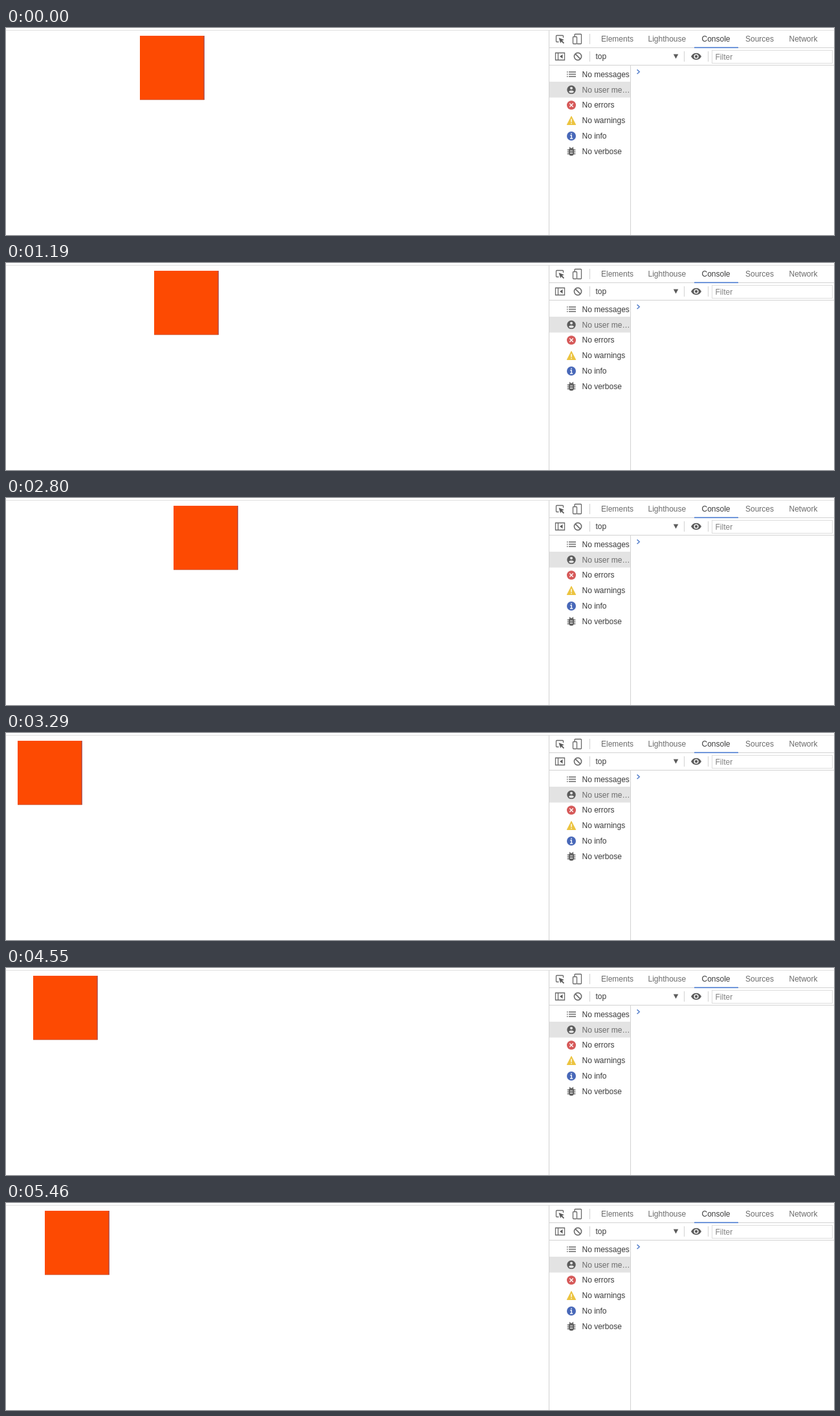
Write an HTML page that moves like this. It is 1280 px wide and 320 px high and loops after 5600 ms.

```html
<!DOCTYPE html>
<html lang="en">
<head>
<meta charset="utf-8">
<title>Moving square</title>
<style>
html, body { margin: 0; width: 100%; height: 100%; overflow: hidden; background: #fff; }
svg { display: block; width: 1280px; height: 320px; }
text { font: 12px "Liberation Sans", Arial, sans-serif; fill: #3a3a3a; }
.soft { fill: #6b6b6b; }
.hint { fill: #828282; }
.rule { fill: none; stroke: #d2d2d2; }
.icon { fill: none; stroke: #6a6a6a; stroke-width: 1.3; }
.solid { fill: #5c5c5c; }
.white { fill: none; stroke: #fff; stroke-width: 1.4; }
</style>
</head>
<body>
<svg viewBox="0 0 1280 320">
  <path class="rule" d="M0 3.5H1280" style="stroke:#dedede"/>

  <g id="box">
    <rect y="12" width="99.5" height="99" fill="#fd4a02"/>
    <path d="M99.2 12V111" stroke="#8a4a66"/>
    <path d="M0 110.8H99.5" stroke="#c25a3c" stroke-width=".8"/>
  </g>

  <!-- panel lines -->
  <path class="rule" d="M839.5 4V320M840 30.5H1280M840 57.5H1280M965.5 58V320M902.5 9V25M902.5 36V52M1048.5 36V52M1085.5 36V52"/>
  <rect class="rule" x="1091.5" y="34.5" width="186" height="20" style="stroke:#dcdcdc"/>
  <rect x="1064" y="29.5" width="68" height="1.6" fill="#4a7bd0"/>
  <rect x="840" y="83" width="125" height="24.5" fill="#e3e3e3"/>

  <!-- tab bar icons -->
  <path class="icon" d="M854.5 21.5H851.5Q850.5 21.5 850.5 20.5V12.5Q850.5 11.5 851.5 11.5H860.5Q861.5 11.5 861.5 12.5V15"/>
  <path class="solid" d="M854.5 15L862.8 18.3L859.8 19.5L863 23L861.8 24.2L858.6 20.9L857.2 23.4Z"/>
  <path class="icon" d="M879 13V10.5Q879 9.5 880 9.5H888.5Q889.5 9.5 889.5 10.5V23.5Q889.5 24.5 888.5 24.5H883M876.5 14.5Q876.5 13.5 877.5 13.5H881.5Q882.5 13.5 882.5 14.5V23.5Q882.5 24.5 881.5 24.5H877.5Q876.5 24.5 876.5 23.5Z"/>

  <!-- filter bar icons -->
  <path class="icon" d="M849.5 38.5H863.5V49.5H849.5ZM853.5 38.5V49.5"/>
  <path class="solid" d="M860.5 40.8V47.2L856 44Z"/>
  <circle class="icon" cx="884" cy="44" r="5.6" style="stroke-width:1.6"/>
  <path class="icon" d="M880.1 40.1L887.9 47.9" style="stroke-width:1.6"/>
  <path class="solid" d="M1031.8 40.5H1039.3L1035.5 47.5Z"/>
  <path class="solid" d="M1059 44Q1061.8 38.8 1067 38.8T1075 44Q1072.2 49.2 1067 49.2T1059 44Z"/>
  <circle cx="1067" cy="44" r="2.9" class="white"/>

  <path d="M975.6 64.4L979.2 67.7L975.6 71" fill="none" stroke="#5580cc" stroke-width="1.5"/>

  <!-- sidebar icons -->
  <path class="icon" d="M870 68H881M870 71.5H881M870 75H881M867 68H868.5M867 71.5H868.5M867 75H868.5"/>
  <circle class="solid" cx="874" cy="95.4" r="6.7"/>
  <circle cx="874" cy="93" r="2.1" fill="#e3e3e3"/>
  <path d="M869.8 98.4Q871 96.4 874 96.4T878.2 98.4Q876.6 100.4 874 100.4T869.8 98.4Z" fill="#e3e3e3"/>
  <circle cx="874" cy="119.2" r="7" fill="#d65a5a"/>
  <path class="white" d="M871.3 116.5L876.7 121.9M876.7 116.5L871.3 121.9"/>
  <path d="M874 136.5L880.7 149.5H867.3Z" fill="#ecc440" stroke="#ecc440" stroke-linejoin="round"/>
  <path class="white" d="M874 140.5V145.5M874 146.8V148.3"/>
  <circle cx="874" cy="167" r="7" fill="#4868b8"/>
  <path class="white" d="M874 162.5V164.3M872.3 166H874.2V170.5M872 170.8H876.2"/>
  <g class="solid">
    <path d="M870 188Q870 185.7 874 185.7T878 188V193.5Q878 197.5 874 197.5T870 193.5Z"/>
    <path class="icon" d="M867.6 188.5H880.4M867.6 191.5H880.4M867.6 194.5H880.4M871 184.3L873 186.5M877 184.3L875 186.5"/>
    <path d="M872 190H876M872 193.3H876" stroke="#fff" stroke-width="1.2"/>
  </g>

  <g id="labels"></g>
</svg>
<script>
const LOOP = 5600, RESET = 2870, CYCLE = 210, TICK = 70;
const box = document.getElementById("box");
const labels = document.getElementById("labels");

function label(text, x, y, cls = "") {
  const el = document.createElementNS("http://www.w3.org/2000/svg", "text");
  el.setAttribute("x", x);
  el.setAttribute("y", y);
  el.setAttribute("class", cls);
  el.textContent = text;
  labels.append(el);
}

[["Elements", 920], ["Lighthouse", 992.5], ["Console", 1075.5], ["Sources", 1143], ["Network", 1210.5]]
  .forEach(([text, x]) => label(text, x, 21, text === "Console" ? "" : "soft"));
label("top", 911.5, 48);
label("Filter", 1096.5, 49, "hint");
["No messages", "No user me…", "No errors", "No warnings", "No info", "No verbose"]
  .forEach((text, i) => label(text, 890.5, 75.7 + 23.87 * i, i === 1 ? "soft" : ""));

// Two 2px moves, then one tick of rest, in every cycle.
function travel(ms) {
  if (ms < 0) return 0;
  return 4 * Math.floor(ms / CYCLE) + (ms % CYCLE >= TICK ? 2 : 0);
}

function boxX(t) {
  return t < RESET ? 207 + travel(t - TICK) : 10 + travel(t - RESET);
}

const start = performance.now();
function draw() {
  const t = (performance.now() - start) % LOOP;
  box.setAttribute("transform", `translate(${boxX(t)} 0)`);
  requestAnimationFrame(draw);
}
draw();
</script>
</body>
</html>
```
